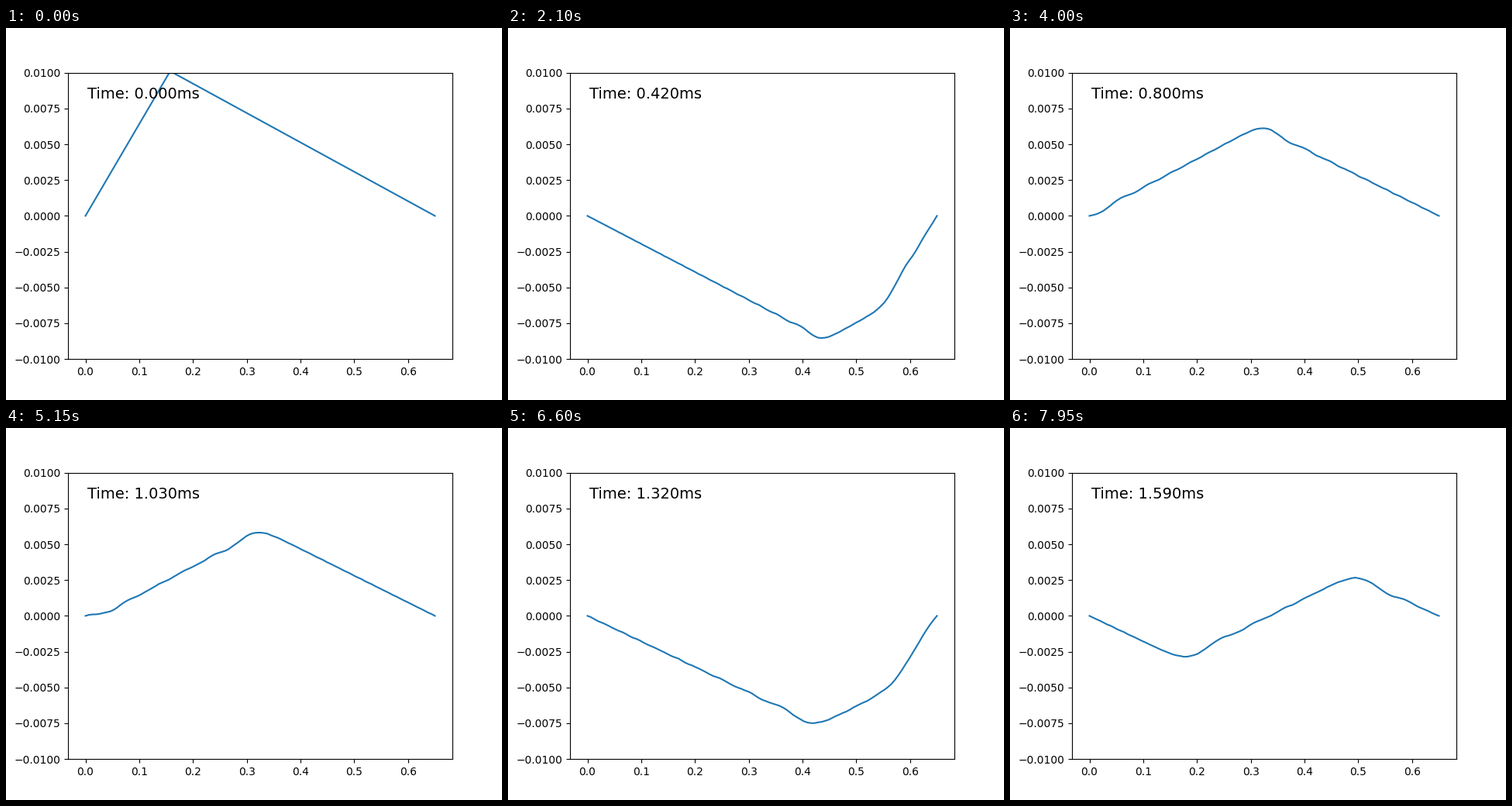
A matplotlib script for the animation above (8 s loop, 640 by 480 pixels).

```python
import numpy as np
import matplotlib.pyplot as plt
from matplotlib.animation import FuncAnimation

# Plucked string, fixed at both ends
LENGTH = 0.65          # m
NODES = 101
PLUCK = 25             # nodes on the rising side
HEIGHT = 0.01          # m
SPEED = 2 * LENGTH * 1100
GAMMA = 1e-4           # damping
DT = 1e-6              # s
STRIDE = 10            # solver steps per frame
FRAMES = 160

DX = LENGTH / (NODES - 1)


def simulate(steps):
    """Damped wave equation, explicit central differences."""
    y = np.zeros((steps, NODES))
    y[0] = np.concatenate([np.linspace(0, HEIGHT, PLUCK),
                           np.linspace(HEIGHT, 0, NODES - PLUCK)])
    y[1] = y[0]
    inertia = 1 / (SPEED * DT) ** 2
    drag = GAMMA / (2 * DT)
    for t in range(1, steps - 1):
        now, before = y[t], y[t - 1]
        bend = (now[:-2] - 2 * now[1:-1] + now[2:]) / DX ** 2
        carry = inertia * (2 * now[1:-1] - before[1:-1])
        y[t + 1, 1:-1] = (bend + carry + drag * before[1:-1]) / (inertia + drag)
    return y


x = np.linspace(0, LENGTH, NODES)
shapes = simulate(FRAMES * STRIDE)[::STRIDE]

fig, ax = plt.subplots(figsize=(6.4, 4.8), dpi=100)
line, = ax.plot(x, shapes[0])
ax.set_ylim(-HEIGHT, HEIGHT)
label = ax.text(0.05, 0.95, "", transform=ax.transAxes, fontsize=14, va="top")


def draw(i):
    line.set_ydata(shapes[i])
    label.set_text(f"Time: {i * STRIDE * DT * 1e3:.3f}ms")
    return line, label


anim = FuncAnimation(fig, draw, frames=FRAMES, interval=50,
                     init_func=lambda: draw(0), repeat=True, repeat_delay=0)
plt.show()
```
